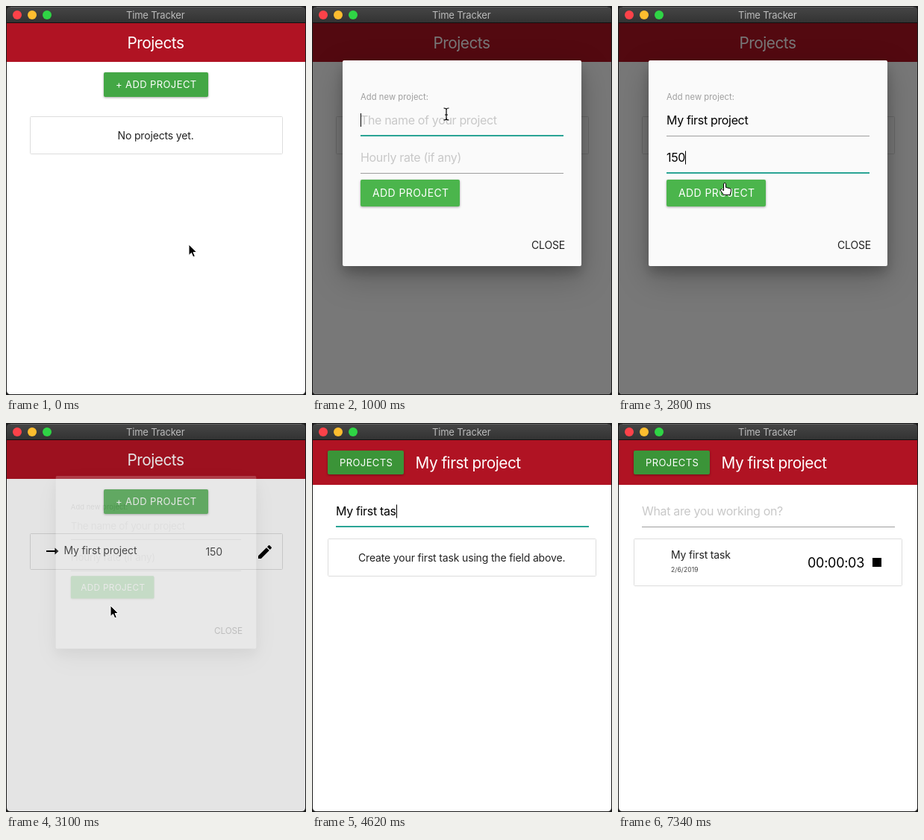
Recreate the animation shown at these times as an HTML page. Size 402 by 522 pixels, loop 7360 ms.

```html
<!DOCTYPE html>
<html lang="en">
<head>
<meta charset="utf-8">
<title>Time Tracker</title>
<style>
html, body { margin: 0; width: 100%; height: 100%; overflow: hidden; background: #222; }
svg { display: block; width: 402px; height: 522px; font-family: Inter, sans-serif; }
text { white-space: pre; }
.title { font-size: 13px; letter-spacing: -.2px; fill: #bbb; }
.head { font-size: 20.8px; letter-spacing: -.5px; fill: #fff; }
.label { font-size: 11.2px; letter-spacing: .07px; fill: #9e9e9e; }
.input { font-size: 16px; letter-spacing: -.34px; }
.body { font-size: 14px; letter-spacing: -.16px; fill: #222; }
.btn { font-size: 13px; letter-spacing: .4px; fill: #fff; }
.big { font-size: 14px; }
.date { font-size: 8.5px; letter-spacing: .1px; fill: #444; }
.clock { font-size: 18px; letter-spacing: -.28px; }
.card { fill: #fff; stroke: #ddd; }
.raised { filter: drop-shadow(0 1.5px 1.5px rgba(0, 0, 0, .35)); }
.deep { filter: drop-shadow(0 9px 8px rgba(0, 0, 0, .2)) drop-shadow(0 14px 20px rgba(0, 0, 0, .22)); }
</style>
</head>
<body>
<svg viewBox="0 0 402 522">
  <defs>
    <linearGradient id="bar" x2="0" y2="1">
      <stop stop-color="#464646"/><stop offset="1" stop-color="#333"/>
    </linearGradient>
    <clipPath id="frame"><path d="M1 23H401V516q0 5-5 5H6q-5 0-5-5Z"/></clipPath>
  </defs>

  <rect width="402" height="522" fill="#1c1c1c"/>
  <path d="M1 22V6q0-5 5-5H396q5 0 5 5V22Z" fill="url(#bar)"/>
  <path d="M6 1.5H396" stroke="#666"/>
  <path d="M1 22.5H401" stroke="#111"/>
  <circle cx="15" cy="12" r="6" fill="#fc4249"/>
  <circle cx="35" cy="12" r="6" fill="#fdbd2f"/>
  <circle cx="55" cy="12" r="6" fill="#2fd445"/>
  <text class="title" x="161" y="17">Time Tracker</text>

  <g clip-path="url(#frame)">
    <rect y="23" width="402" height="499" fill="#fff"/>

    <g id="projects">
      <rect y="23" width="402" height="52" fill="#b01323"/>
      <text class="head" x="162.5" y="57">Projects</text>
      <rect class="raised" x="131" y="89" width="140" height="33" rx="2" fill="#43a745"/>
      <text class="btn" x="147" y="110">+ ADD PROJECT</text>
      <g id="noProjects">
        <rect class="card" x="32.5" y="148.5" width="338" height="50" rx="1"/>
        <text class="body" x="149.5" y="179">No projects yet.</text>
      </g>
      <g id="projectRow">
        <rect class="card" x="32.5" y="148.5" width="338" height="48" rx="1"/>
        <path d="M54 171H65.5V167.5L70.5 172L65.5 176.5V173H54Z"/>
        <text class="body" x="77.5" y="176">My first project</text>
        <text class="body" x="267.5" y="178">150</text>
        <path d="M338 182V178.2L349 167.2L352.8 171L341.8 182ZM350 166.2L351.9 164.3Q352.6 163.7 353.3 164.3L355.7 166.7Q356.3 167.4 355.7 168.1L353.8 170Z"/>
      </g>
    </g>

    <g id="tasks">
      <rect y="23" width="402" height="60" fill="#b01323"/>
      <rect class="raised" x="21" y="37" width="102" height="32" rx="2" fill="#3b9438"/>
      <text class="btn" x="37" y="58">PROJECTS</text>
      <text class="head" x="138.5" y="61">My first project</text>
      <g id="taskField"></g>
      <g id="noTasks">
        <rect class="card" x="21.5" y="155.5" width="359" height="50" rx="1"/>
        <text class="body" x="62" y="186">Create your first task using the field above.</text>
      </g>
      <g id="taskRow">
        <rect class="card" x="21.5" y="155.5" width="359" height="63" rx="1"/>
        <text class="body" x="71" y="182">My first task</text>
        <text class="date" x="71" y="200">2/6/2019</text>
        <text id="clock" class="clock" x="254" y="194"></text>
        <rect x="341" y="181" width="12" height="12"/>
      </g>
    </g>

    <rect id="shade" y="23" width="402" height="499"/>
    <g id="modal">
      <rect class="deep" x="41" y="73" width="320" height="276" rx="2" fill="#fafafa"/>
      <text class="label" x="65" y="126">Add new project:</text>
      <g id="nameField"></g>
      <g id="rateField"></g>
      <rect class="raised" x="65" y="233" width="133" height="36" rx="2" fill="#4bb54c"/>
      <text class="btn big" x="81" y="256">ADD PROJECT</text>
      <text class="body" x="294" y="326">CLOSE</text>
    </g>
  </g>

  <g id="cursor">
    <path id="arrow" d="M0 0V14.5L3.4 11.4L5.8 16.8L8.3 15.7L6 10.5H10.6Z" stroke="#fff"/>
    <path id="hand" d="M-1.5 1Q0-1 1.5 1V6L7.5 7.5Q9 8 8.5 10.5L7 16H-1.5L-6 9.5Q-5.5 7.5-3.5 8.5L-1.5 10.5Z" fill="#fff" stroke="#000"/>
    <path id="beam" d="M-3.5-8Q0-8 0-6Q0-8 3.5-8M0-6.5V6.5M-3.5 8Q0 8 0 6Q0 8 3.5 8M-2 1H2" fill="none" stroke="#000" stroke-width="1.2"/>
  </g>
</svg>
<script>
const LOOP = 7360, FADE = 184;
const OPEN = 700, CLOSE = 3024, PAGE = 3600, START = 5100, SECOND = 740;
const $ = id => document.getElementById(id);
const show = (id, on) => $(id).style.display = on ? '' : 'none';
const clamp = u => Math.min(1, Math.max(0, u));
const easeOut = u => 1 - (1 - clamp(u)) ** 3;
const typed = (text, t, from, step) =>
  text.slice(0, Math.max(0, Math.floor((t - from) / step) + 1));

function makeField(id, x, baseline, width, hint) {
  const g = $(id), lineY = baseline + 15.5;
  g.innerHTML = `<text class="input" x="${x}" y="${baseline}"></text>
    <rect class="line" x="${x}" width="${width}"/>
    <rect class="caret" y="${baseline - 14.5}" width="1" height="18"/>`;
  const [text, line, caret] = g.children;
  return (value, focus) => {
    text.textContent = value || hint;
    text.setAttribute('fill', value ? '#000' : '#c8c8c8');
    line.setAttribute('y', Math.floor(lineY) - (focus ? 1 : 0));
    line.setAttribute('height', focus ? 2 : 1);
    line.setAttribute('fill', focus ? '#2aa495' : '#9e9e9e');
    caret.style.display = focus ? '' : 'none';
    caret.setAttribute('x', Math.round(x + (value ? text.getComputedTextLength() : 0)));
  };
}
const setName = makeField('nameField', 65, 158.5, 272, 'The name of your project');
const setRate = makeField('rateField', 65, 209, 272, 'Hourly rate (if any)');
const setTask = makeField('taskField', 32, 124, 339, 'What are you working on?');

// Pointer stops: time, x, y
const stops = [[80, 245, 320], [560, 200, 105], [740, 200, 105], [960, 180, 145],
  [2560, 180, 145], [2850, 140, 245], [3150, 140, 245], [3480, 128, 171],
  [3680, 128, 171], [3860, 130, 118]];

function pointerAt(t) {
  let i = stops.findIndex(s => s[0] > t);
  if (i < 0) return stops.at(-1).slice(1);
  if (!i) return stops[0].slice(1);
  const [t0, x0, y0] = stops[i - 1], [t1, x1, y1] = stops[i];
  let u = (t - t0) / (t1 - t0);
  u = u * u * (3 - 2 * u);
  return [x0 + (x1 - x0) * u, y0 + (y1 - y0) * u];
}

function pointerShape(t, x, y) {
  const inside = (l, top, r, b) => x >= l && x <= r && y >= top && y <= b;
  if (t < OPEN) return inside(131, 89, 271, 122) ? 'hand' : 'arrow';
  if (t < CLOSE) {
    if (inside(65, 130, 337, 175) || inside(65, 182, 337, 225)) return 'beam';
    return inside(65, 233, 198, 269) ? 'hand' : 'arrow';
  }
  if (t < PAGE) return inside(33, 149, 330, 197) ? 'hand' : 'arrow';
  return inside(32, 100, 371, 140) ? 'beam' : 'arrow';
}

function draw(t) {
  const added = t >= CLOSE, running = t >= START;
  show('projects', t < PAGE);
  show('tasks', t >= PAGE);
  show('noProjects', !added);
  show('projectRow', added);
  show('noTasks', !running);
  show('taskRow', running);

  const away = added ? easeOut((t - CLOSE) / FADE) : 1 - easeOut((t - OPEN) / FADE);
  show('modal', away < 1);
  $('shade').setAttribute('opacity', .53 * (1 - away));
  $('modal').setAttribute('opacity', 1 - away);
  $('modal').setAttribute('transform',
    `translate(201 ${211 - 30 * away}) scale(${1 - .2 * away}) translate(-201 -211)`);

  setName(added ? '' : typed('My first project', t, 1150, 58), t >= 960 && t < 2170);
  setRate(added ? '' : typed('150', t, 2260, 80), t >= 2170 && t < 2960);
  setTask(running ? '' : typed('My first task', t, 3970, 55), t >= 3880 && !running);
  $('clock').textContent = '00:00:0' + Math.max(0, Math.floor((t - START) / SECOND));

  const [x, y] = pointerAt(t), shape = pointerShape(t, x, y);
  show('cursor', t < 1150 || t >= 2560 && t < 3970);
  $('cursor').setAttribute('transform', `translate(${x} ${y})`);
  for (const id of ['arrow', 'hand', 'beam']) show(id, id === shape);
}

const begin = performance.now();
function tick() {
  draw((performance.now() - begin) % LOOP);
  requestAnimationFrame(tick);
}
tick();
</script>
</body>
</html>
```
